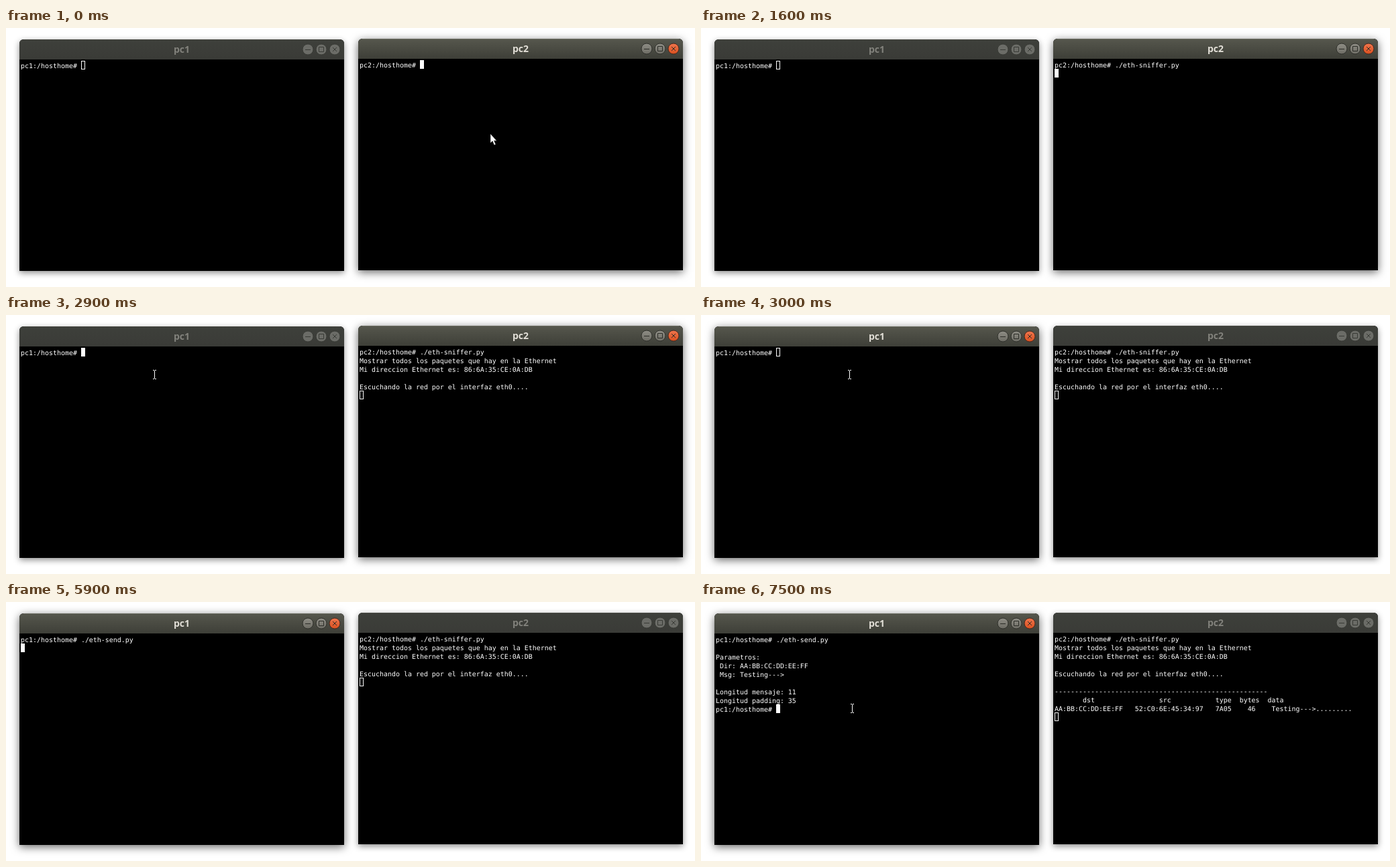
These frames come from a looping animation (1027x387 px, 8000 ms). An HTML page:

```html
<!DOCTYPE html>
<html lang="es">
<head>
<meta charset="utf-8">
<title>Ethernet sniffer</title>
<style>
html, body { margin: 0; width: 100%; height: 100%; overflow: hidden; background: #fff; }
svg { display: block; width: 1027px; height: 387px; }
.frame { fill: #000; filter: drop-shadow(0 3px 5px rgba(0,0,0,.45)); }
.on .frame { filter: drop-shadow(0 3px 6.5px rgba(0,0,0,.6)); }
.bar { fill: url(#barOff); }
.on .bar { fill: url(#barOn); }
.edge { stroke: #4a4b45; }
.on .edge { stroke: #6b6c61; }
.title { font: bold 14px "Open Sans", "Noto Sans", sans-serif; text-anchor: middle; fill: #82827c; }
.on .title { fill: #e2dfd7; }
.btn circle { fill: #6b6c67; stroke: #393b36; }
.on .btn circle { fill: url(#btnOn); stroke: #2f302b; }
.on .btn.close circle { fill: url(#closeOn); stroke: #46281d; }
.btn path { fill: none; stroke: #383a35; }
.on .btn path { stroke: #2b2c27; }
.term text { font: 9.967px "DejaVu Sans Mono", monospace; fill: #fff; white-space: pre; text-rendering: geometricPrecision; }
.solid { fill: #fff; }
.hollow { fill: none; stroke: #fff; }
</style>
</head>
<body>
<svg id="stage" viewBox="0 0 1027 387">
  <defs>
    <linearGradient id="barOn" x2="0" y2="1"><stop stop-color="#56574d"/><stop offset="1" stop-color="#3e3f38"/></linearGradient>
    <linearGradient id="barOff" x2="0" y2="1"><stop stop-color="#3e403b"/><stop offset="1" stop-color="#3a3b37"/></linearGradient>
    <linearGradient id="btnOn" x2="0" y2="1"><stop stop-color="#8e8d85"/><stop offset="1" stop-color="#6d6c64"/></linearGradient>
    <linearGradient id="closeOn" x2="0" y2="1"><stop stop-color="#f0764e"/><stop offset="1" stop-color="#d9501f"/></linearGradient>
  </defs>
</svg>
<script>
const LOOP = 8000, CW = 6, CH = 13;
const stage = document.getElementById('stage');

function add(parent, tag, attrs = {}) {
  const el = document.createElementNS('http://www.w3.org/2000/svg', tag);
  for (const k in attrs) el.setAttribute(k, attrs[k]);
  parent.append(el);
  return el;
}

function makeWindow(name, x, y) {
  const g = add(stage, 'g', { transform: `translate(${x} ${y})` });
  const top = 'M0 30V7Q0 0 7 0H477Q484 0 484 7V30';
  add(g, 'path', { class: 'frame', d: top + 'V346H0Z' });
  add(g, 'path', { class: 'bar', d: top + 'Z' });
  add(g, 'path', { class: 'edge', d: 'M6 .5H478' });
  add(g, 'text', { class: 'title', x: 242, y: 20 }).textContent = name;
  const icons = ['M-4 .5H4', 'M-3.5 -3.5H3.5V3.5H-3.5Z', 'M-3 -3L3 3M3 -3L-3 3'];
  icons.forEach((d, i) => {
    const b = add(g, 'g', { class: i == 2 ? 'btn close' : 'btn', transform: `translate(${430 + 20 * i} 15)` });
    add(b, 'circle', { r: 8 });
    add(b, 'path', { d });
  });
  const term = add(g, 'g', { class: 'term', transform: 'translate(2 32)' });
  const rows = Array.from({ length: 10 }, (_, i) => add(term, 'text', { x: 0, y: 11 + CH * i }));
  const cursor = add(term, 'rect');

  return (text, active, typing) => {
    g.setAttribute('class', active ? 'on' : 'off');
    const lines = text.split('\n');
    rows.forEach((r, i) => {
      const s = lines[i] || '';
      if (r.textContent !== s) r.textContent = s;
    });
    const inset = typing ? 0 : 0.5;
    const box = {
      class: typing ? 'solid' : 'hollow',
      x: lines.at(-1).length * CW + inset, y: (lines.length - 1) * CH + inset,
      width: CW - 2 * inset, height: CH - 2 * inset
    };
    for (const k in box) cursor.setAttribute(k, box[k]);
  };
}

const drawPc1 = makeWindow('pc1', 20, 17);
const drawPc2 = makeWindow('pc2', 525, 16);

const arrow = add(stage, 'path', { d: 'M0 0V14L3.2 11L5.6 17L8 16L5.6 10.4H9.5Z', fill: '#fff', stroke: '#000', 'stroke-width': .5 });
const beam = add(stage, 'path', { d: 'M0 .5H2M3 .5H5M2.5 1V13M0 13.5H2M3 13.5H5', fill: 'none', stroke: '#fff' });

// Terminal contents: [start time, text]; the cursor sits at the end.
const p1 = 'pc1:/hosthome# ', p2 = 'pc2:/hosthome# ';
const send = p1 + './eth-send.py';
const sent = send + '\n\nParametros:\n Dir: AA:BB:CC:DD:EE:FF\n Msg: Testing--->\n\n' +
  'Longitud mensaje: 11\nLongitud padding: 35\n';
const sniff = p2 + './eth-sniffer.py ';
const intro = sniff + '\nMostrar todos los paquetes que hay en la Ethernet\n' +
  'Mi direccion Ethernet es: 86:6A:35:CE:0A:DB\n';
const listen = intro + '\nEscuchando la red por el interfaz eth0....\n';
const at = (col, s, line = '') => line.padEnd(col) + s;
const cells = list => list.reduce((line, [col, s]) => at(col, s, line), '');
const packet = listen + '\n' + '-'.repeat(53) + '\n' +
  cells([[7, 'dst'], [26, 'src'], [40, 'type'], [46, 'bytes'], [53, 'data']]) + '\n' +
  cells([[0, 'AA:BB:CC:DD:EE:FF'], [20, '52:C0:6E:45:34:97'], [40, '7A05'], [48, '46'], [54, 'Testing--->.........']]) + '\n';

const text1 = [[0, p1], [3900, p1 + 'clear'], [4200, send], [5900, send + '\n'], [6200, sent], [6300, sent + p1]];
const text2 = [[0, p2], [300, p2 + 'clear'], [800, sniff], [1600, sniff + '\n'], [1800, intro], [1900, listen], [6300, packet]];

// Which window is focused and which one has the keyboard.
const focus = [[0, 2], [3000, 1]];
const keys = [[0, 2], [2900, 1], [3000, 0], [3200, 1]];

// Pointer: [start time, shape, x, y]
const pointer = [
  [0, arrow, 722, 158], [300],
  [2300, beam, 599, 116], [2400, beam, 440, 88], [2500, beam, 295, 65],
  [2900, beam, 219, 82], [3200, beam, 224, 86], [3500, beam, 224, 87], [3900],
  [7100, beam, 224, 87], [7500, beam, 223, 152]
];

const pick = (steps, t) => steps.findLast(s => s[0] <= t);

function draw(t) {
  const win = pick(focus, t)[1], key = pick(keys, t)[1];
  drawPc1(pick(text1, t)[1], win == 1, key == 1);
  drawPc2(pick(text2, t)[1], win == 2, key == 2);
  const [, shape, x, y] = pick(pointer, t);
  for (const el of [arrow, beam]) el.setAttribute('visibility', el === shape ? 'visible' : 'hidden');
  if (shape) shape.setAttribute('transform', `translate(${x} ${y})`);
}

const start = performance.now();
function tick() {
  draw((performance.now() - start) % LOOP);
  requestAnimationFrame(tick);
}
tick();
</script>
</body>
</html>
```
